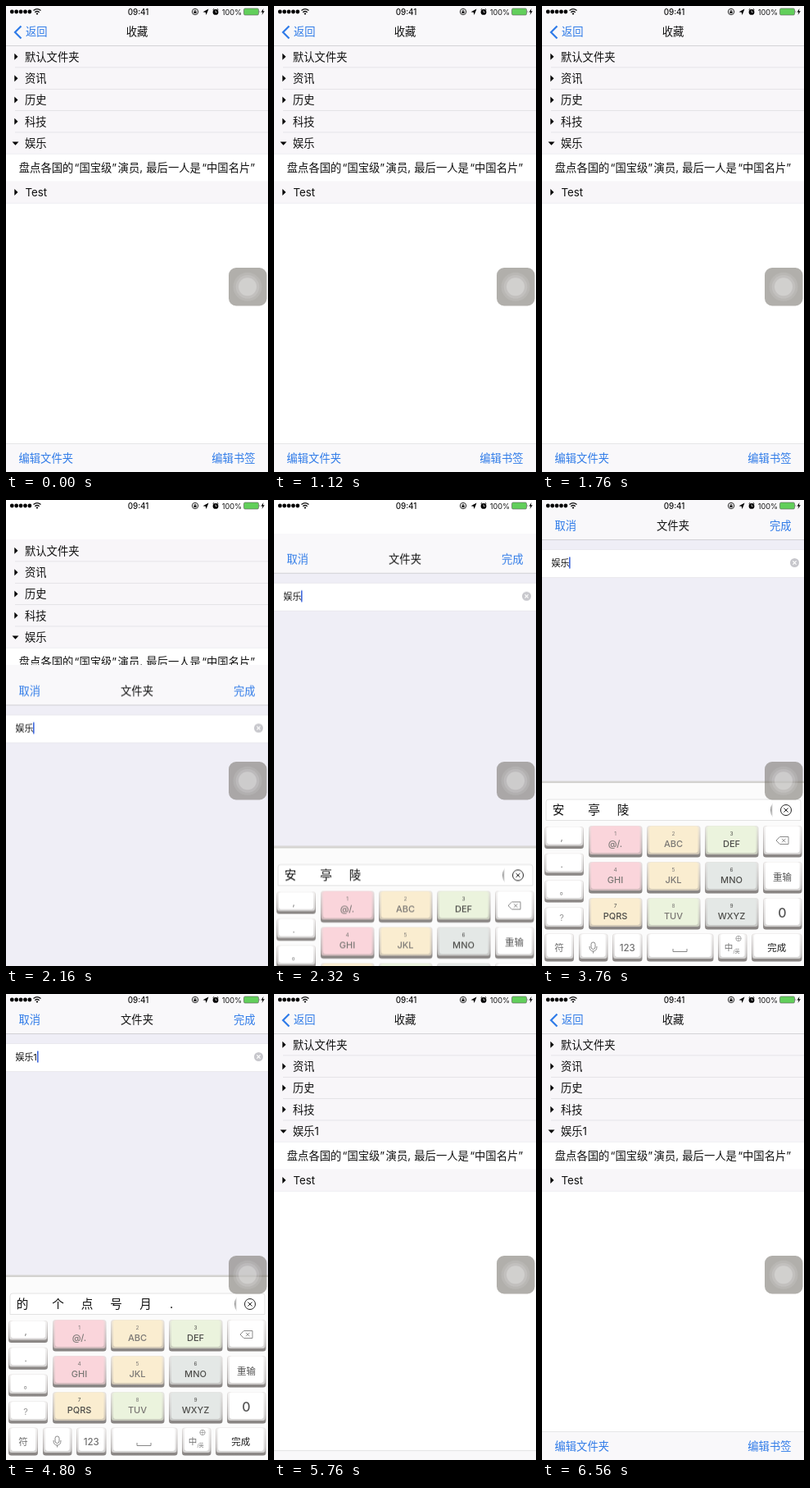
An HTML page for the animation above (6.72 s loop, 320x568 px).

```html
<!DOCTYPE html>
<html lang="zh-CN">
<head>
<meta charset="utf-8">
<title>收藏</title>
<style>
  html, body { margin: 0; width: 100%; height: 100%; overflow: hidden; background: #fff; }
  svg { display: block; width: 320px; height: 568px; }
  text { font: 13.3px Inter, "Noto Sans CJK SC", sans-serif; fill: #111; white-space: pre; }
  .blue { fill: #2f7be8; }
  .bold { font-weight: 500; }
  .mid { text-anchor: middle; }
  .end { text-anchor: end; }
  .bar { fill: #f9f8fa; }
  .line { fill: #c4c4c8; }
  .key { fill: #707070; text-anchor: middle; }
  .icon { fill: none; stroke: #222; stroke-width: 1; }

  .nav, .tools, .actions, .sheet, .board, .renamed, .typed, .before, .caret { animation: 6720ms infinite; }
  .nav, .actions, .renamed, .typed, .before, .caret { animation-timing-function: step-end; }
  .nav { animation-name: nav; }
  .tools { animation-name: tools; }
  .actions { animation-name: actions; }
  .sheet { animation-name: sheet; }
  .board { animation-name: board; }
  .renamed { animation-name: renamed; }
  .typed { animation-name: typed; }
  .before { animation-name: before; }
  .caret { animation-name: caret; }

  @keyframes nav {
    0% { opacity: 1; } 29.167% { opacity: 0; } 77.381%, 100% { opacity: 1; }
  }
  @keyframes tools {
    0%, 29.167% { transform: none; animation-timing-function: ease-in-out; }
    32.143%, 84.524% { transform: translateY(35px); animation-timing-function: ease-in-out; }
    87.5%, 100% { transform: none; }
  }
  @keyframes actions {
    0% { opacity: 1; } 32.143% { opacity: 0; } 86.31%, 100% { opacity: 1; }
  }
  @keyframes sheet {
    0%, 29.167% { transform: translateY(568px); animation-timing-function: ease; }
    37.143%, 77.381% { transform: none; animation-timing-function: ease; }
    84.821%, 100% { transform: translateY(568px); }
  }
  @keyframes board {
    0%, 32.738% { transform: translateY(227px); animation-timing-function: ease; }
    37.5%, 77.381% { transform: none; animation-timing-function: ease; }
    81.25%, 100% { transform: translateY(227px); }
  }
  @keyframes renamed { 0% { opacity: 0; } 77.381%, 100% { opacity: 1; } }
  @keyframes typed { 0% { opacity: 0; } 65.476%, 100% { opacity: 1; } }
  @keyframes before { 0% { opacity: 1; } 65.476%, 100% { opacity: 0; } }
  @keyframes caret { 0% { transform: none; } 65.476%, 100% { transform: translateX(5px); } }
</style>
</head>
<body>
<svg viewBox="0 0 320 568">
  <defs>
    <linearGradient id="side" x2="0" y2="1">
      <stop offset="0" stop-color="#e6e3e2"/>
      <stop offset=".7" stop-color="#b3afae"/>
      <stop offset="1" stop-color="#827e7c"/>
    </linearGradient>
    <linearGradient id="fade">
      <stop offset="0" stop-color="#777"/>
      <stop offset="1" stop-color="#fff"/>
    </linearGradient>
  </defs>
  <rect width="320" height="568" fill="#fff"/>

  <g id="list"></g>

  <g class="nav">
    <rect class="bar" width="320" height="48"/>
    <rect class="line" y="48" width="320" height=".7"/>
    <path d="M18.5 24.5L11 32L18.5 39.5" fill="none" stroke="#2f7be8" stroke-width="2.2"/>
    <text class="blue" x="24" y="36.4">返回</text>
    <text class="bold mid" x="160" y="36.4">收藏</text>
  </g>

  <g class="tools">
    <rect class="bar" y="533" width="320" height="35"/>
    <rect y="533" width="320" height=".7" fill="#dedee0"/>
    <g class="actions">
      <text class="blue" x="15.5" y="556">编辑文件夹</text>
      <text class="blue end" x="304.5" y="556">编辑书签</text>
    </g>
  </g>

  <g class="sheet">
    <rect width="320" height="568" fill="#efeef6"/>
    <rect class="bar" width="320" height="48"/>
    <rect class="line" y="48" width="320" height=".7"/>
    <text class="blue" x="15.5" y="36.4">取消</text>
    <text class="bold mid" x="160" y="36.4">文件夹</text>
    <text class="blue end" x="304.5" y="36.4">完成</text>
    <rect y="60.5" width="320" height="34" fill="#fff"/>
    <path d="M0 60.5H320M0 94.5H320" stroke="#e2e1e6" stroke-width=".6"/>
    <text x="11.5" y="80.5" style="font-size:11px">娱乐</text>
    <text class="typed" x="33.3" y="80.5" style="font-size:11px">1</text>
    <rect class="caret" x="33" y="69.5" width="1.6" height="14" fill="#3f68dc"/>
    <circle cx="308.5" cy="76.5" r="5.5" fill="#c7c7cc"/>
    <path d="M306.4 74.4l4.2 4.2m0-4.2l-4.2 4.2" stroke="#fff" stroke-width="1.2"/>
  </g>

  <g class="board">
    <rect y="343" width="320" height="225" fill="#fbfbfb"/>
    <rect y="342.5" width="320" height="2.5" fill="#d3d2cf"/>
    <path d="M5 390.5V368q0-3 3-3H313q3 0 3 3V390.5Z" fill="#fff" stroke="#dcdcdc" stroke-width=".8"/>
    <path d="M282 369q-6 9 0 18Z" fill="url(#fade)"/>
    <circle class="icon" cx="298" cy="378" r="6.5"/>
    <path class="icon" d="M295.5 375.5l5 5m0-5l-5 5"/>
    <g id="words"></g>
    <g id="keys"></g>
    <path class="icon" style="stroke:#8a8a8a" d="M286 415l4.5-4.5H301v9H290.5ZM293 412.8l4.5 4.5m0-4.5l-4.5 4.5"/>
    <g class="icon" style="stroke:#888">
      <rect x="60" y="539" width="5" height="8.5" rx="2.5"/>
      <path d="M58 544q0 6 4.5 6t4.5-6M62.5 550v2.5"/>
      <path d="M160 547v3.5h17V547"/>
      <circle cx="240" cy="534.5" r="3.2" stroke-width=".7"/>
      <path d="M236.8 534.5h6.4M240 531.3v6.4" stroke-width=".6"/>
    </g>
  </g>

  <g id="status">
    <g id="dots"></g>
    <g fill="none" stroke="#111" stroke-width="1.3">
      <path d="M33.5 5.6q4.5-4 9 0M35.3 7.7q2.7-2.4 5.4 0"/>
      <circle cx="231" cy="7" r="3.7" stroke-width=".9"/>
      <path d="M230 6.5V5.7q1-1.2 2 0v.8" stroke-width=".7"/>
    </g>
    <circle cx="38" cy="9.5" r="1.1"/>
    <rect x="229.4" y="6.5" width="3.2" height="2.5"/>
    <path d="M240.5 7.3L247.5 3.5L244.5 11L243.7 7.7Z"/>
    <circle cx="256" cy="7.4" r="3.4"/>
    <path d="M252.6 4.6l1.6-1.3M259.400 4.6l-1.6-1.3" stroke="#111"/>
    <path d="M256 5.3v2.200h1.6" fill="none" stroke="#fff" stroke-width=".7"/>
    <text class="mid bold" x="161.5" y="10.5" style="font-size:9.8px">09:41</text>
    <text class="end" x="288" y="10.5" style="font-size:9.2px">100%</text>
    <rect x="290.5" y="3" width="18" height="8" rx="1.5" fill="#62cf5b" stroke="#555" stroke-width=".6"/>
    <path d="M309.7 5.5q1.4 1.5 0 3Z" fill="#555"/>
    <path d="M314.5 3l-3 4.5h2l-1 3.5l3.3-4.8h-2Z"/>
  </g>

  <g>
    <rect x="272" y="319" width="46.5" height="46.5" rx="9" fill="#706c64" fill-opacity=".54"/>
    <g fill="#fff">
      <circle cx="295" cy="342.3" r="17.5" opacity=".1"/>
      <circle cx="295" cy="342.3" r="14.3" opacity=".13"/>
      <circle cx="295" cy="342.3" r="11" opacity=".25"/>
    </g>
  </g>
</svg>
<script>
  const $ = id => document.getElementById(id);
  const label = (x, y, s, size, cls = 'key', fill = '') =>
    `<text class="${cls}" x="${x}" y="${y}" style="font-size:${size}px;${fill && 'fill:' + fill}">${s}</text>`;

  // Folder list
  const pitch = 26.35;
  let list = '<rect y="48" width="320" height="132.3" fill="#f8f6f9"/><rect y="213.5" width="320" height="27" fill="#f8f6f9"/>';
  const closed = y => `<path d="M10.3 ${y - 4}v8l4.2-4Z"/>`;
  ['默认文件夹', '资讯', '历史', '科技', '娱乐'].forEach((name, i) => {
    const y = 61.8 + i * pitch;
    list += label(23, y + 4.9, name, 13.3, '');
    list += i < 4 ? closed(y) : `<path d="M7.5 ${y - 1.8}h8l-4 4.3Z"/>`;
    if (i) list += `<rect x="11" y="${y - 13.6}" width="309" height=".7" fill="#dcdbe0"/>`;
  });
  list += label(49.6, 172.1, '1', 13.3, 'renamed');
  list += '<path d="M0 180.3H320M0 240.3H320" stroke="#e6e5e9" stroke-width=".6"/>';
  [[15.8, '盘点各国的'], [83.6, '“国宝级”'], [136.6, '演员,'], [171.3, '最后一人是'], [239.2, '“中国名片”']]
    .forEach(([x, s]) => list += label(x, 202.3, s, 13.3, ''));
  list += closed(227) + label(23.5, 232, 'Test', 13.3, '');
  $('list').innerHTML = list;

  $('dots').innerHTML = [0, 1, 2, 3, 4].map(i => `<circle cx="${7.3 + i * 5.4}" cy="7" r="2.4"/>`).join('');

  // Suggestions
  const spots = [20, 63.5, 99, 134.5, 170.5, 202];
  const words = (cls, s) => `<g class="${cls}">` +
    [...s].map((c, i) => label(spots[i], 383.3, c, 14.6, 'mid')).join('') + '</g>';
  $('words').innerHTML = words('before', '安亭陵') + words('typed', '的个点号月.');

  // Keyboard
  const key = (x, y, w, h, face = '#fff') =>
    `<rect x="${x}" y="${y}" width="${w}" height="${h}" rx="3.5" fill="url(#side)"/>` +
    `<rect x="${x + 1}" y="${y + .5}" width="${w - 2}" height="${h - 4}" rx="3" fill="${face}" opacity=".6"/>` +
    `<rect x="${x + 3}" y="${y + .5}" width="${w - 6}" height="${h - 6}" rx="3" fill="${face}"/>`;
  const pink = '#fad5db', cream = '#faedd0', green = '#ebf3dd', gray = '#e4e8e6';
  const faces = [pink, cream, green, pink, cream, gray, cream, green, gray];
  const dark = ['DEF', 'MNO', 'PQRS', 'WXYZ'];
  let keys = '';
  ['@/.', 'ABC', 'DEF', 'GHI', 'JKL', 'MNO', 'PQRS', 'TUV', 'WXYZ'].forEach((s, i) => {
    const x = 57 + i % 3 * 71, y = 397 + Math.floor(i / 3) * 44;
    const ink = dark.includes(s) ? '#4d4d4a' : '#7a7774';
    keys += key(x, y, 65.5, 38.5, faces[i]) +
      label(x + 32.5, y + 12, i + 1, 6.5, 'key', ink) + label(x + 32.5, y + 25.8, s, 11, 'key bold', ink);
  });
  [',', '.', '。', '?'].forEach((s, i) => {
    const y = 398 + i * 32.8;
    keys += key(3, y, 48, 27) + label(i === 2 ? 27 : 24, y + 17, s, 11, 'key', i === 3 ? '#999' : '');
  });
  ['', '重输', '0'].forEach((s, i) => {
    const y = 397 + i * 44;
    keys += key(270, y, 47.5, 38.5) + label(293.5, y + (i === 2 ? 23.5 : 22.5), s, i === 2 ? 16 : 11.5, 'key bold', '#555');
  });
  [[3, 36, '符'], [45, 35.5, ''], [86, 36.5, '123'], [128, 81.5, ''], [215, 35.5, ''], [256, 61.5, '完成']]
    .forEach(([x, w, s]) => {
      keys += key(x, 528.5, w, 34) + label(x + w / 2, 549.5, s, 11.5, 'key bold', x > 250 ? '#222' : '');
    });
  keys += label(228, 549, '中', 10.5) + label(237.5, 551.5, '/英', 6);
  $('keys').innerHTML = keys;
</script>
</body>
</html>
```
